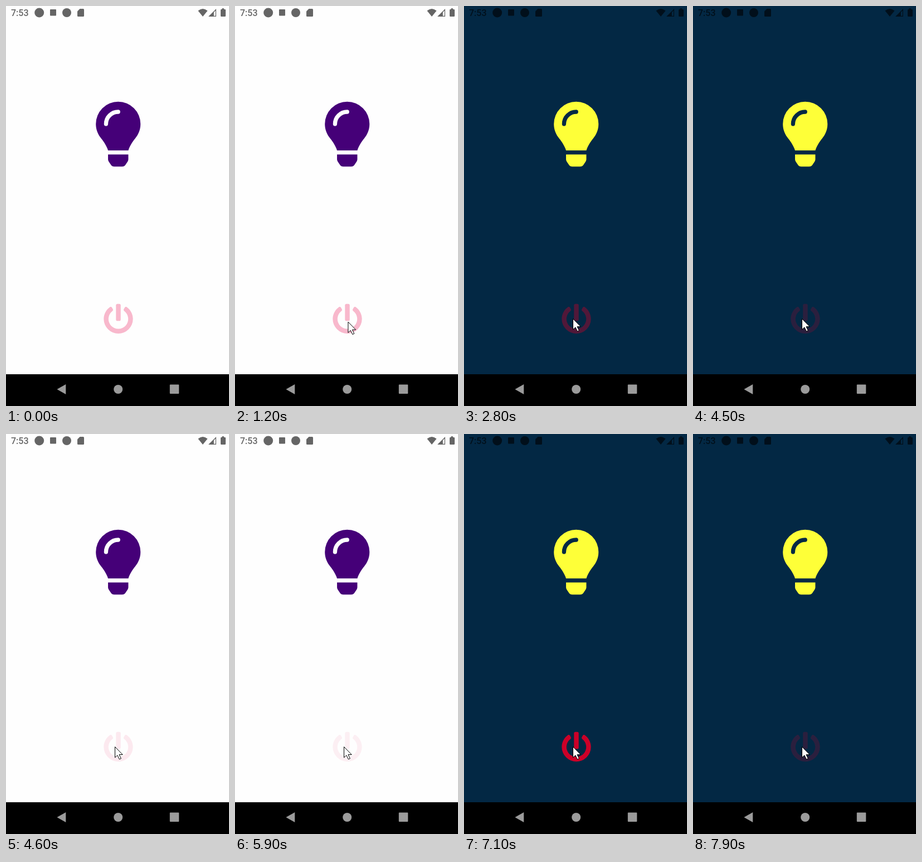
Recreate the animation shown at these times as an HTML page. Size 400 by 718 pixels, loop 8000 ms.

```html
<!DOCTYPE html>
<html lang="en">
<head>
<meta charset="utf-8">
<title>Light switch</title>
<style>
  html, body { margin: 0; width: 100%; height: 100%; overflow: hidden; }
  svg { display: block; width: 100vw; height: 100vh; }
  text { font: 500 16px Roboto, sans-serif; }
</style>
</head>
<body>
<svg viewBox="0 0 400 718">
  <rect id="room" width="400" height="662"/>

  <g opacity=".6">
    <text x="9" y="18">7:53</text>
    <circle cx="59.7" cy="12" r="8.5"/>
    <rect x="79" y="6" width="11" height="11.5" rx="1"/>
    <circle cx="109" cy="12" r="8"/>
    <path d="M132.5 5H138.5Q140 5 140 6.5V17.5Q140 19 138.5 19H129.5Q128 19 128 17.5V9.5Z"/>
    <path d="M344.5 8.5Q353 1.5 361.5 8.5L353 19Z"/>
    <path fill-rule="evenodd" d="M363 19L377 5V19ZM372.8 11.2V17.8H375.8V8.2Z"/>
    <path d="M387.3 4.3H391.2V6H392.7Q394 6 394 7.3V17.7Q394 19 392.7 19H386.3Q385 19 385 17.7V7.3Q385 6 386.3 6H387.3Z"/>
  </g>

  <g id="bulb" transform="translate(161.2 171.8) scale(.2275)">
    <path d="M0 176c0 44.4 16.5 84.9 43.6 115.8 16.5 18.8 42.3 58.2 52.2 92.2h160.4c9.9-34 35.7-73.4 52.2-92.2C335.5 260.9 352 220.4 352 176a176 176 0 0 0-352 0z"/>
    <path d="M96 416h160v38.4q0 9.5-5.4 17.7l-17 25.7a32 32 0 0 1-26.7 14.2h-61.8a32 32 0 0 1-26.6-14.2l-17.1-25.7q-5.4-8.2-5.4-17.7z"/>
    <path id="shine" d="M80 176a96 96 0 0 1 96-96" fill="none" stroke-width="32" stroke-linecap="round"/>
  </g>

  <g id="power" transform="translate(174.5 534.8) scale(.1055)">
    <path d="M400 54c63 45 104 119 104 202a248 248 0 0 1-496 0c0-83 41-157 104-202 12-8 28-5 35 8l16 28c6 10 3 24-7 31a168 168 0 1 0 200 0c-10-7-13-21-7-31l16-28c7-12 23-16 35-8z"/>
    <rect x="216" width="80" height="288" rx="24"/>
  </g>

  <rect y="661" width="400" height="57"/>
  <g fill="#9b9b9b">
    <path d="M91.5 688L107.3 679V697Z"/>
    <circle cx="201.2" cy="688" r="8"/>
    <rect x="293.8" y="679.5" width="16.5" height="16.5" rx="1"/>
  </g>

  <path id="cursor" d="M0 0V19.3L4.4 15.2L7.9 22.4L10.9 21L7.5 14H13.7Z" fill="#fff" stroke="#000"/>
</svg>
<script>
const LOOP = 8000;
const light = { room: '#fefefe', bulb: '#450078', power: '#f8b8cc' };
const dark = { room: '#032844', bulb: '#feff38', power: '#cc0028' };

// lead: how far the fade back has run when the lamp switches
const presses = [
  { down: 2400, up: 2800, lead: 85 },
  { down: 4370, up: 4600, lead: 60 },
  { down: 5740, up: 6100, lead: 50 },
  { down: 7740, up: LOOP, lead: 0 }
];
const start = [347, 676], end = [195.5, 561.5];

const el = id => document.getElementById(id);
const clamp = x => Math.min(1, Math.max(0, x));
const inOut = x => x < .5 ? 2 * x * x : 1 - 2 * (1 - x) ** 2;
const mix = (a, b, k) => a + (b - a) * k;

function powerOpacity(t) {
  const p = presses.filter(p => t >= p.down).pop();
  if (!p) return 1;
  return t < p.up
    ? mix(1, .2, inOut(clamp((t - p.down) / 110)))
    : mix(.2, 1, inOut(clamp((t - p.up + p.lead) / 250)));
}

function draw(t) {
  const on = presses.filter(p => t >= p.up).length % 2;
  const look = on ? dark : light;
  for (const id in look) el(id).setAttribute('fill', look[id]);
  el('shine').setAttribute('stroke', look.room);
  el('power').setAttribute('opacity', powerOpacity(t));

  const k = 1 - (1 - clamp((t - 500) / 900)) ** 2;
  const [x, y] = start.map((s, i) => mix(s, end[i], k));
  el('cursor').setAttribute('transform', `translate(${x} ${y})`);
  el('cursor').setAttribute('visibility', t < 500 ? 'hidden' : 'visible');
}

function tick() {
  draw(performance.now() % LOOP);
  requestAnimationFrame(tick);
}
tick();
</script>
</body>
</html>
```
